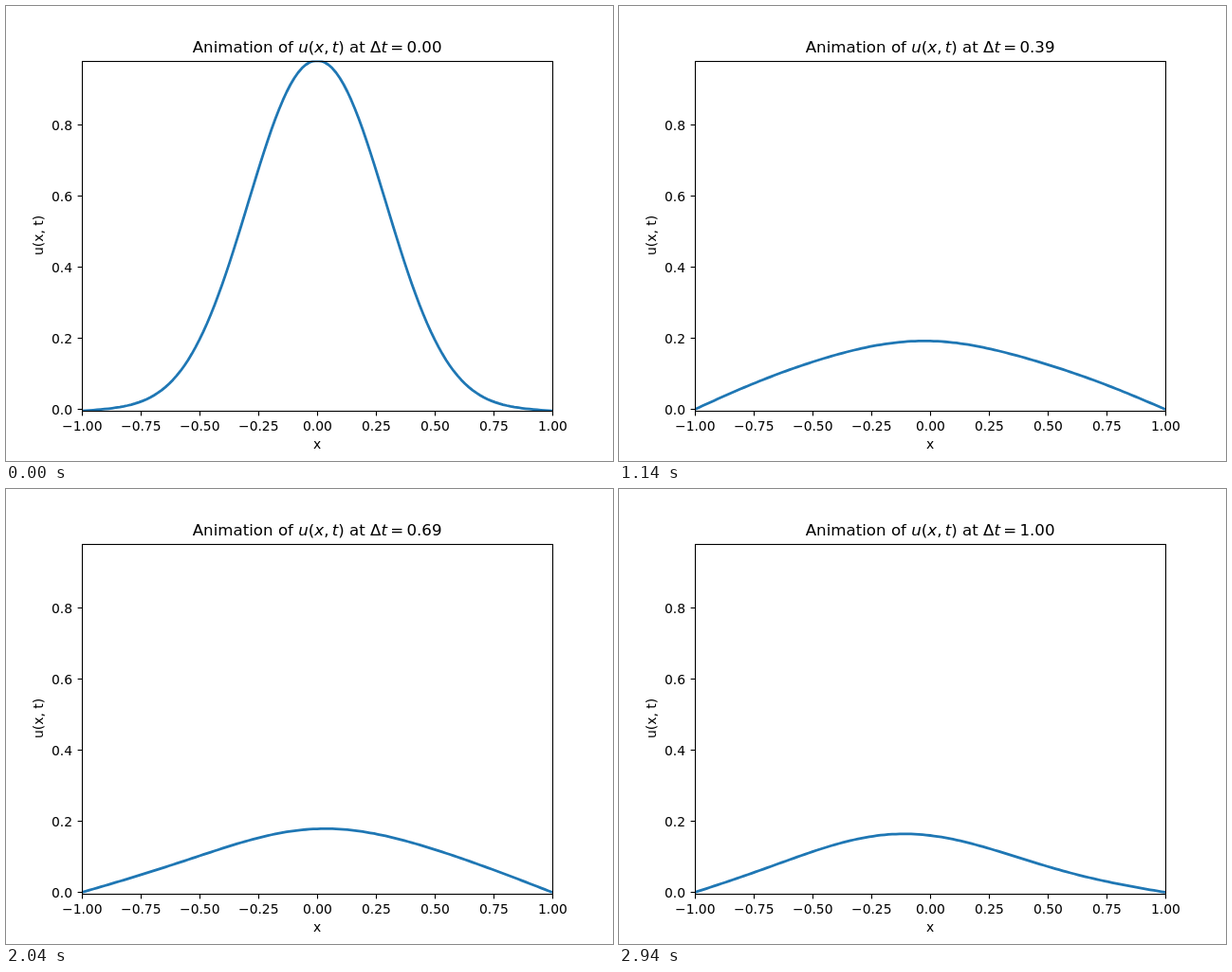
An HTML page with a canvas that plays this animation: 640x480 px, repeating every 3000 ms.

```html
<!DOCTYPE html>
<html lang="en">
<head>
<meta charset="utf-8">
<title>Animation of u(x, t)</title>
<style>
  html, body { margin: 0; width: 100%; height: 100%; overflow: hidden; background: #fff; }
  canvas { display: block; }
</style>
</head>
<body>
<canvas id="plot" width="640" height="480"></canvas>
<script>
const ctx = document.getElementById('plot').getContext('2d');
const STEPS = 50, STEP_MS = 60;
const LEFT = 80, RIGHT = 576, TOP = 57.6, BOTTOM = 427.2, ZERO = 425.5, UNIT = 375;
const FONT = '"DejaVu Sans", Verdana, sans-serif';

// Amplitudes in px of the sine modes 1 to 5, which are zero at both walls
const keys = [
  { step: 5, modes: [132.1, -1.9, -0.4, 0.6, -1.9] },
  { step: 12, modes: [83.5, 0.6, -10.8, 0.6, 0.8] },
  { step: 19, modes: [70.4, 1.4, -1.1, -0.2, 0.6] },
  { step: 27, modes: [71.6, -3.4, -4.2, -0.2, 0.4] },
  { step: 41, modes: [54.4, -1.1, -2.9, -0.4, 0.2] },
  { step: 49, modes: [54.8, 7.8, -5.2, -0.8, 0] }
];
const keySteps = keys.map(k => k.step);

// Cubic Hermite interpolation through (xs, ys)
function spline(xs, ys, x) {
  const last = xs.length - 1;
  let i = 0;
  while (i < last - 1 && x > xs[i + 1]) i++;
  const slope = j => {
    const a = Math.max(j - 1, 0), b = Math.min(j + 1, last);
    return (ys[b] - ys[a]) / (xs[b] - xs[a]);
  };
  const h = xs[i + 1] - xs[i], s = (x - xs[i]) / h, r = 1 - s;
  return ys[i] * r * r * (1 + 2 * s) + ys[i + 1] * s * s * (1 + 2 * r)
    + h * s * r * (slope(i) * r - slope(i + 1) * s);
}

// Starting curve
function bell(x) {
  const d = Math.abs(x);
  return UNIT * (0.981 * Math.exp(-6.9 * d ** 2.1) - 0.0055 * d ** 6);
}

// Share of the starting curve left at a step
function bellShare(step) {
  const end = Math.exp(-3);
  return Math.max(0, (Math.exp(-0.6 * step) - end) / (1 - end));
}

// anchor: 0 left, 0.5 centre, 1 right
function text(str, x, y, anchor = 0.5) {
  ctx.font = `13.89px ${FONT}`;
  ctx.fillText(str, Math.round(x - anchor * ctx.measureText(str).width), y);
}

function line(x1, y1, x2, y2) {
  ctx.beginPath();
  ctx.moveTo(x1, y1);
  ctx.lineTo(x2, y2);
  ctx.stroke();
}

function drawTitle(step) {
  const gap = 3.25;
  let x = 196.7;
  const put = (str, style = '') => {
    ctx.font = `${style} 16.67px ${FONT}`;
    ctx.fillText(str, x, 49);
    x += ctx.measureText(str).width;
  };
  put('Animation of ');
  put('u', 'italic');
  put('(');
  put('x', 'italic');
  put(',');
  x += gap;
  put('t', 'italic');
  put(') at Δ');
  put('t', 'italic');
  x += gap;
  put('=');
  x += gap;
  put((step / (STEPS - 1)).toFixed(2));
}

function drawCurve(step) {
  const share = bellShare(step);
  const modes = keys[0].modes.map((_, n) =>
    spline(keySteps, keys.map(k => k.modes[n]), Math.max(step, keySteps[0])));
  ctx.save();
  ctx.beginPath();
  ctx.rect(LEFT, TOP, RIGHT - LEFT, BOTTOM - TOP);
  ctx.clip();
  ctx.beginPath();
  for (let px = LEFT; px <= RIGHT; px += 4) {
    const phase = Math.PI * (px - LEFT) / (RIGHT - LEFT);
    const spread = modes.reduce((sum, a, n) => sum + a * Math.sin((n + 1) * phase), 0);
    const height = spread + share * (bell((px - 328) / 248) - spread);
    ctx.lineTo(px, ZERO - height);
  }
  ctx.strokeStyle = '#1f77b4';
  ctx.lineWidth = 2.78;
  ctx.lineJoin = 'round';
  ctx.stroke();
  ctx.restore();
}

function drawAxes() {
  ctx.strokeStyle = ctx.fillStyle = '#000';
  ctx.lineWidth = 1.11;
  ctx.strokeRect(80.5, 58.5, 496, 369);
  for (let i = 0; i <= 8; i++) {
    const x = LEFT + 62 * i;
    line(x + 0.5, 427.5, x + 0.5, 432.4);
    text((i / 4 - 1).toFixed(2).replace('-', '−'), x, 448);
  }
  for (let i = 0; i <= 4; i++) {
    const y = ZERO - 75 * i;
    line(75.6, y, 80.5, y);
    text((i / 5).toFixed(1), 70.3, y + 5.5, 1);
  }
  text('x', 328, 467);
  ctx.save();
  ctx.translate(39, 242);
  ctx.rotate(-Math.PI / 2);
  text('u(x, t)', 0, 0);
  ctx.restore();
}

function draw() {
  const step = Math.floor(performance.now() / STEP_MS) % STEPS;
  ctx.fillStyle = '#fff';
  ctx.fillRect(0, 0, 640, 480);
  drawCurve(step);
  drawAxes();
  drawTitle(step);
  requestAnimationFrame(draw);
}
draw();
</script>
</body>
</html>
```
